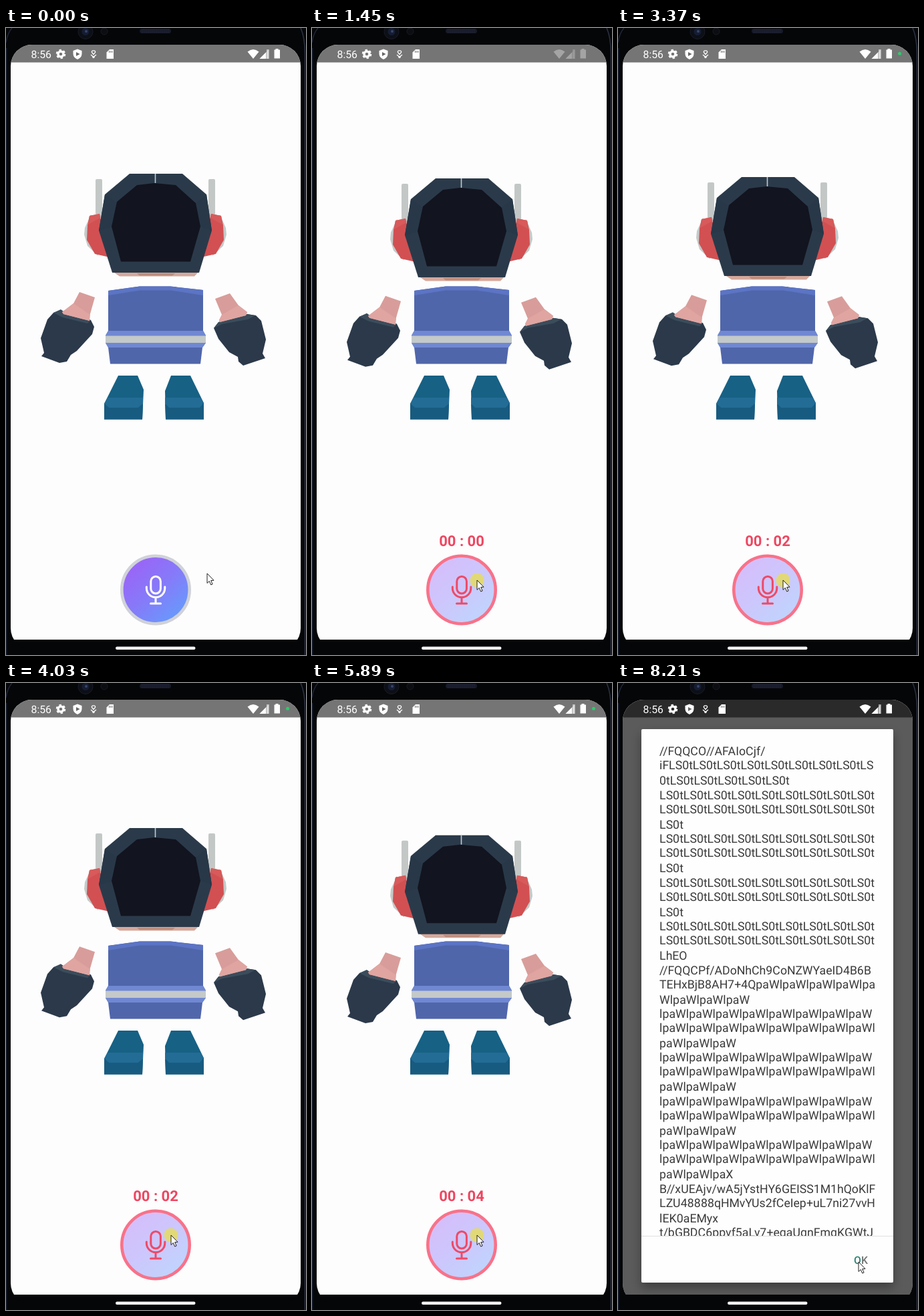
An HTML page for the animation above (8.28 s loop, 449 by 938 pixels).

```html
<!DOCTYPE html>
<html lang="en">
<head>
<meta charset="utf-8">
<title>Voice recorder robot</title>
<style>
html, body { margin: 0; width: 100%; height: 100%; overflow: hidden; background: #050608; }
svg { display: block; width: 449px; height: 938px; }
text { font-family: Roboto, "Liberation Sans", sans-serif; white-space: pre; text-rendering: geometricPrecision; }
</style>
</head>
<body>
<svg viewBox="0 0 449 938" width="449" height="938">
  <defs>
    <clipPath id="screenClip"><rect x="7" y="25" width="434" height="905" rx="32"/></clipPath>
    <clipPath id="textClip"><rect x="35" y="69" width="377" height="758"/></clipPath>
    <linearGradient id="btnFill" x1="0.15" y1="0.1" x2="0.85" y2="0.9">
      <stop offset="0.1" stop-color="#9768f7"/>
      <stop offset="0.5" stop-color="#867af9"/>
      <stop offset="0.95" stop-color="#6a97fb"/>
    </linearGradient>
    <filter id="shadow" x="-15%" y="-10%" width="130%" height="120%">
      <feDropShadow dx="0" dy="7" stdDeviation="8" flood-opacity="0.35"/>
    </filter>
    <g id="ear">
      <path d="M127 279L118 299L117 309L122 326L138 341Z" fill="#c5cac8"/>
      <path d="M134 228Q134 226 136 226H142Q144 226 144 228V284H134Z" fill="#c3c8c6"/>
      <path d="M125 281L140 278L155 343L133 338L121 317L122 295Z" fill="#d25052"/>
      <path d="M125 281L140 278L141 284L123 294Z" fill="#d85a5a"/>
    </g>
  </defs>

  <!-- phone bezel -->
  <rect width="449" height="938" fill="#050608"/>
  <path d="M0.7 30V938" stroke="#171d31" stroke-width="1.4"/>
  <path d="M441 0Q447.5 14 447.5 40V938" fill="none" stroke="#2b3040" stroke-width="1.6"/>
  <path d="M0 22Q2 8 9 0" fill="none" stroke="#20263a" stroke-width="1.4"/>
  <circle cx="119" cy="5.500" r="11" fill="#0d0f17" stroke="#181b26"/>
  <circle cx="119" cy="5.500" r="5.500" fill="#151d33"/>
  <circle cx="120" cy="5" r="2" fill="#35446a"/>
  <circle cx="147" cy="5" r="5" fill="#0c0d12" stroke="#1a1b22"/>
  <rect x="200" y="1" width="47" height="7" rx="3.500" fill="#171a29"/>
  <path d="M203 3H244M203 6H244" stroke="#272b3f" stroke-dasharray="1.500 1.500"/>

  <g clip-path="url(#screenClip)">
    <rect x="7" y="25" width="434" height="890" fill="#fdfdfd"/>
    <rect x="7" y="25" width="434" height="26.500" fill="#757575"/>

    <g id="body">
      <path d="M153 393L200 386.500H246L295 392L295 453L299 460V471L294 478L291 502.500H156L153 478L149 471V460L153 453Z" fill="#5066ab"/>
      <path d="M153 393L200 386.500H246L295 392V400L247 392.500H200L153 400Z" fill="#5c74c4"/>
      <path d="M153 453H295L299 460V471L294 478H153L149 471V460Z" fill="#7088d2"/>
      <path d="M149 460.500H299V471H149Z" fill="#c4c9c9"/>
      <path d="M168 520H197L206 541L204 585.500H147V562Z" fill="#176185"/>
      <path d="M152 553H205V562L198 568H154L147 562Z" fill="#226c95"/>
      <path d="M147 562L154 568H198L205 562L204 585.500H147Z" fill="#185b80"/>
      <path d="M247 520H276L296 561V585.500H239L238 543Z" fill="#176185"/>
      <path d="M238 553H291L296 561L290 568H244L238 562Z" fill="#226c95"/>
      <path d="M238 562L244 568H290L296 561V585.500H239Z" fill="#185b80"/>
    </g>

    <g id="arms">
      <path d="M82 422L90 426L127 437L132 447L129 458L106 483L97 489L91 499L80 501L53 491L57 486L52 464L62 436L71 426Z" fill="#2b394a"/>
      <path d="M71 426L82 421L90 427L127 437L122 442L85 433Z" fill="#3b4c5b"/>
      <path d="M110 395L133 403L125 431V438L86 428L84 425L101 412Z" fill="#d89d9a"/>
      <path d="M101 412L84 425L86 428L125 438L126 429Z" fill="#e0a5a1"/>
      <path d="M311 449L318 440L361 428L374 430L382 438L389 466L384 487L388 494L355 505L348 499L347 492L334 485L318 465Z" fill="#2b394a"/>
      <path d="M311 449L318 440L361 428L373 430L362 436L323 443Z" fill="#3b4c5b"/>
      <path d="M313 405L335 397L348 415L361 425L359 430L320 440L319 437L323 429Z" fill="#d89d9a"/>
      <path d="M348 415L361 425L359 430L320 440L319 437L323 429Z" fill="#e0a5a1"/>
    </g>

    <g id="head">
      <use href="#ear"/>
      <use href="#ear" transform="matrix(-1 0 0 1 447 0)"/>
      <path d="M159 364H289L282 371.500H170Z" fill="#d5a89b"/>
      <path d="M196 367H253L249 370.500H200Z" fill="#c08c7b"/>
      <path d="M185 218H264L300 249L308 303L289 366H159L139 303L148 249Z" fill="#2b3a4a"/>
      <path d="M139 303L148 249L166 262L158 298ZM300 249L308 303L291 297L284 262Z" fill="#283848"/>
      <path d="M196 235L222 232L254 235L284 262L291 297L276 349.500H172L158 297L166 260Z" fill="#12141f"/>
      <path d="M223.500 218V232" stroke="#c3c9cb" stroke-width="1.600"/>
    </g>

    <text id="timer" x="224" y="775" font-size="22" font-weight="700" text-anchor="middle" fill="#ee4661"></text>
    <circle cx="224" cy="840.500" r="50.500" fill="url(#btnFill)"/>
    <circle id="pale" cx="224" cy="840.500" r="50.500" fill="#fff" opacity="0.58"/>
    <circle id="ring" cx="224" cy="840.500" r="50.700" fill="none" stroke-width="4.600"/>
    <g id="mic" fill="none" stroke-width="3" stroke-linecap="round">
      <rect x="216.800" y="820.500" width="14.600" height="25.500" rx="7.300"/>
      <path d="M210.300 836V838A13.700 13.700 0 0 0 237.800 838V836M224 852V860.500M216.500 861H231.500"/>
    </g>

    <rect id="dim" x="7" y="25" width="434" height="890" fill="#000"/>

    <!-- status bar -->
    <text x="37.500" y="45" font-size="15.800" fill="#fff">8:56</text>
    <g fill="#fff">
      <circle cx="82" cy="39" r="4" fill="none" stroke="#fff" stroke-width="3.400"/>
      <circle cx="82" cy="39" r="6.300" fill="none" stroke="#fff" stroke-width="2" stroke-dasharray="3.300 3.300"/>
      <path d="M107 31.500L113.500 34V39Q113 44.500 107 47Q101 44.500 100.500 39V34Z"/>
      <path d="M105 36L110.500 39L105 42Z" fill="#666"/>
      <path d="M131 39.500L128.500 36.500A1.900 1.900 0 0 1 131 34A1.900 1.900 0 0 1 133.500 36.500ZM127 40L131 43.500L135 40" fill="none" stroke="#fff" stroke-width="1.300"/>
      <circle cx="131" cy="43.500" r="1.700"/>
      <path d="M155 32H161V46H150.500V36.500Z"/>
      <path d="M154.500 34V37M156.700 34V37M158.900 34V37" stroke="#757575" stroke-width="1"/>
    </g>
    <g id="signals" fill="#fff">
      <path d="M361.500 35.500Q370 28.500 378.500 35.500L370 46Z"/>
      <path d="M393.500 32V46H379.500Z" opacity="0.45"/>
      <path d="M389 36.500V46H379.500Z"/>
      <path d="M390 32H393.500V46H390Z" opacity="0.55"/>
      <path d="M403.500 31H407.500V32.500H410V45.500H401.500V32.500H403.500Z"/>
    </g>
    <g id="chip">
      <rect id="chipBox" fill="#2fc96f"/>
      <path id="chipMic" d="M411 34V39M407.500 38A3.500 3.500 0 0 0 414.500 38M411 41.500V44" fill="none" stroke="#fff" stroke-width="1.800" stroke-linecap="round"/>
    </g>

    <g id="dialog">
      <rect x="35" y="69" width="377" height="828" rx="2" fill="#fefefe" filter="url(#shadow)"/>
      <g id="lines" clip-path="url(#textClip)" fill="#3a3a3a"></g>
      <path d="M35 827.500H412" stroke="#e0e0e0"/>
      <rect id="bar" x="408" y="69" width="4" height="63.500" fill="#b0b0b0"/>
      <text x="353" y="868.500" font-size="15.800" font-weight="500" fill="#737373"><tspan id="okO">O</tspan>K</text>
    </g>
    <rect x="7" y="915" width="434" height="23" fill="#050608"/>
  </g>

  <rect x="164" y="925.500" width="119.500" height="4.500" rx="2.200" fill="#f4f4f4"/>
  <circle id="touch" cx="247" cy="826" r="10.500" fill="#e1d878"/>
  <path id="cursor" d="M0 0V14.500L3.300 11.500L5.700 17L8.100 16L5.700 10.600L10 10.300Z" fill="#fff" stroke="#222" stroke-width="1" stroke-linejoin="round"/>
</svg>

<script>
const LOOP = 8280, PRESS = 1250, RELEASE = 6120, OPEN = 6360;
const DEVICE_FONT = 44, DEVICE_SCALE = .402;
const $ = id => document.getElementById(id);
const set = (id, attrs) => { for (const k in attrs) $(id).setAttribute(k, attrs[k]); };
const ramp = (t, a, b) => Math.min(1, Math.max(0, (t - a) / (b - a)));
const smooth = p => p * p * (3 - 2 * p);
const mix = (a, b, p) => a + (b - a) * p;

// piecewise linear curve through [time, value...] points
function along(points, t, ease = p => p) {
  let i = 1;
  while (i < points.length - 1 && t > points[i][0]) i++;
  const a = points[i - 1], b = points[i];
  const p = ease(ramp(t, a[0], b[0]));
  return a.slice(1).map((v, k) => mix(v, b[k + 1], p));
}

const bobCycles = [[0, .196], [1450, 1.677], [2640, 2.696], [4030, 3.823], [5170, 4.97], [6490, 6.157], [6630, 6.28]];
const cursorPath = [[0, 301, 816], [250, 301, 816], [830, 247, 826], [6930, 247, 826],
  [7350, 356, 858], [7500, 356, 858], [7620, 360, 866]];

const pen = document.createElement('canvas').getContext('2d');
pen.font = DEVICE_FONT + 'px Roboto, "Liberation Sans", sans-serif';
const widthOf = s => pen.measureText(s).width;

// the phone lays glyphs out on whole device pixels
function glyphXs(row, x) {
  return [...row].map((c, i) => {
    const at = x, next = row[i + 1] || '';
    x += Math.round(widthOf(c + next) - widthOf(next)) * DEVICE_SCALE;
    return at.toFixed(2);
  }).join(' ');
}

function fillDialog() {
  const ls = 'LS0t', lp = 'lpaW';
  const dashes = [ls.repeat(9), ls.repeat(9), ls];
  const waves = [lp.repeat(8), lp.repeat(8) + 'l', 'paWlpaWlpaW'];
  const rows = [
    '//FQQCO//AFAIoCjf/', 'iF' + ls.repeat(8) + 'LS', '0t' + ls.repeat(5),
    ...dashes, ...dashes, ...dashes, dashes[0], dashes[1], 'LhEO',
    '//FQQCPf/ADoNhCh9CoNZWYaeID4B6B', 'TEHxBjB8AH7+4Q' + 'paWl'.repeat(4) + 'pa', 'W' + lp.repeat(3),
    ...waves, ...waves, ...waves, waves[0], waves[1], 'paWlpaWlpaX',
    'B//xUEAjv/wA5jYstHY6GEISS1M1hQoKlF', 'LZU48888qHMvYUs2fCeIep+uL7ni27vvH', 'lEK0aEMyx',
    't/bGBDC6ppvf5aLv7+eqaUqnFmqKGWtJ'
  ];
  $('lines').setAttribute('font-size', DEVICE_FONT * DEVICE_SCALE);
  rows.forEach((row, i) => {
    const el = document.createElementNS('http://www.w3.org/2000/svg', 'text');
    el.setAttribute('x', glyphXs(row, 62));
    el.setAttribute('y', 108.3 + 65.45 * Math.floor(i / 3) + [0, 21, 44][i % 3]);
    el.textContent = row;
    $('lines').append(el);
  });
}

function drawRobot(t) {
  const [cycle] = along(bobCycles, t);
  const lift = 3 - 9 * Math.cos(2 * Math.PI * cycle);
  set('head', { transform: `translate(0 ${lift.toFixed(2)})` });
  set('arms', { transform: `translate(0 ${(lift * .83).toFixed(2)})` });
}

function drawButton(t) {
  const rec = t >= PRESS && t < RELEASE;
  set('pale', { visibility: rec ? 'visible' : 'hidden' });
  set('ring', { stroke: rec ? '#f8728a' : '#d0d2d9' });
  set('mic', { stroke: rec ? '#ee4a68' : '#fff' });
  $('timer').textContent = rec ? '00 : 0' + Math.floor((t - PRESS) / 1000) : '';
  set('touch', { visibility: t >= 1150 && t < RELEASE ? 'visible' : 'hidden' });
}

function drawStatus(t) {
  const hide = ramp(t, 1330, 1480) * (1 - ramp(t, 2420, 2570));
  set('signals', { opacity: 1 - .82 * hide });
  // privacy chip opens, narrows to a capsule, then shrinks to a dot
  const grow = smooth(ramp(t, 1760, 1960));
  const narrow = smooth(ramp(t, 2350, 2600));
  const dot = smooth(ramp(t, 2640, 2840));
  const w = mix(mix(30 * grow, 9, narrow), 5, dot);
  const h = mix(mix(18 * grow, 11, narrow), 5, dot);
  const right = mix(426, 424, dot);
  set('chipBox', { x: right - w, y: 38.3 - h / 2, width: w, height: h, rx: Math.min(w, h) / 2 });
  set('chipMic', { opacity: grow * (1 - ramp(t, 2350, 2450)) });
  set('chip', { opacity: 1 - ramp(t, 6370, 6530) });
}

function drawDialog(t) {
  const p = ramp(t, OPEN, OPEN + 220);
  const shown = 1 - (1 - p) * (1 - p);
  set('dim', { opacity: .64 * ramp(t, 6400, 6630) });
  set('dialog', { opacity: shown, transform: `translate(0 ${(26 * (1 - shown)).toFixed(2)})` });
  set('bar', { opacity: 1 - ramp(t, 7960, 8200) });
  set('okO', { fill: t >= 7550 ? '#2b8577' : '#737373' });
}

function draw(t) {
  drawRobot(t);
  drawButton(t);
  drawStatus(t);
  drawDialog(t);
  const [x, y] = along(cursorPath, t, smooth);
  set('cursor', { transform: `translate(${x.toFixed(2)} ${y.toFixed(2)})` });
}

fillDialog();
draw(0);
let start;
function tick(now) {
  start ??= now;
  draw((now - start) % LOOP);
  requestAnimationFrame(tick);
}
requestAnimationFrame(tick);
</script>
</body>
</html>
```
